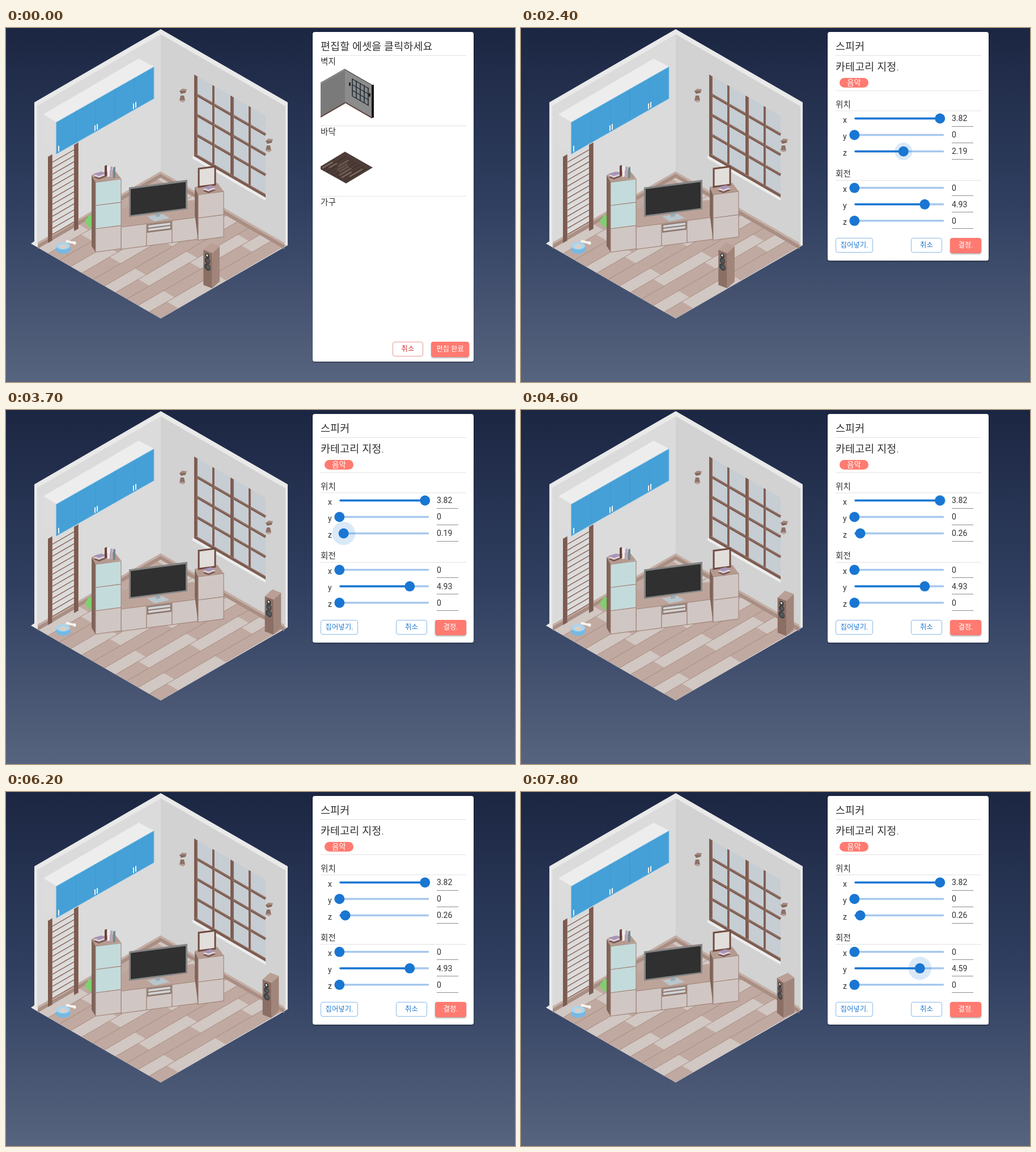
An HTML page for the animation above (8 s loop, 898 px wide and 624 px high).

```html
<!DOCTYPE html>
<html lang="ko">
<head>
<meta charset="utf-8">
<style>
  html, body { margin: 0; width: 100%; height: 100%; overflow: hidden; background: #1b2642; }
  svg { display: block; width: 898px; height: 624px; }
  text { font-family: Roboto, "Noto Sans CJK KR", "Noto Sans CJK", sans-serif; fill: #303030; font-size: 14px; }
  .title { font-size: 18.4px; font-weight: 300; letter-spacing: .2px; }
  .head { font-size: 14.6px; font-weight: 300; }
  .mid { text-anchor: middle; font-size: 12.4px; }
  .rule { stroke: #e2e2e2; }
</style>
</head>
<body>
<svg id="stage" viewBox="0 0 898 624"></svg>
<script>
const LOOP = 8000, STEP = 100;
const BLUE = '#1976d2', CORAL = '#ff7a70', WOOD = '#7d5b50', EDGE = '#a3877c', PALE = '#d0c7c4', TOP = '#b59a8f', SIDE = '#80645a';
const ISO = .577, FRONT = -.13;

const poly = (pts, fill, more = '') => `<polygon points="${pts}" fill="${fill}" ${more}/>`;
const rect = (x, y, w, h, fill, more = '') => `<rect x="${x}" y="${y}" width="${w}" height="${h}" fill="${fill}" ${more}/>`;
const line = (x1, y1, x2, y2, stroke, w = 1) => `<path d="M${x1} ${y1}L${x2} ${y2}" stroke="${stroke}" stroke-width="${w}"/>`;
const disc = (x, y, rx, ry, fill) => `<ellipse cx="${x}" cy="${y}" rx="${rx}" ry="${ry}" fill="${fill}"/>`;
const text = (x, y, s, cls = '', more = '') => `<text x="${x}" y="${y}" class="${cls}" ${more}>${s}</text>`;
const rule = y => `<path class="rule" d="M555 ${y}H812"/>`;
const range = (n, fn) => Array.from({ length: n }, (_, i) => fn(i)).join('');
const shift = (x, y, body) => `<g transform="translate(${x} ${y})">${body}</g>`;

// Upright parallelogram: vertical sides, sloping top and bottom.
const slab = (x, y, w, h, slope, fill, more) =>
  poly([[x, y], [x + w, y + w * slope], [x + w, y + w * slope + h], [x, y + h]].join(' '), fill, more);
const slope = (x, y, w, k, stroke, width) => line(x, y, x + w, y + w * k, stroke, width);

function seeded(seed) {
  return () => (seed = seed * 16807 % 2147483647) / 2147483647;
}

function shell() {
  return poly('273,2 497,131 497,383 273,512 44,380 50,376 50,131', '#e9e9e9') +
    slab(55, 137, 218, 243, -ISO, '#dbdbdb') + slab(273, 11, 220, 243, ISO, '#d2d2d2');
}

// Planks run from the lower left edge up to the right, each with one light board.
function floor() {
  const at = (u, v) => `${(55 + 19.8 * u + 222 * v).toFixed(1)},${(386 + 11.45 * u - 129 * v).toFixed(1)}`;
  const board = (u, a, b) => poly([at(u, a), at(u + 1, a), at(u + 1, b), at(u, b)].join(' '), '#d1c7c3');
  const light = u => {
    const a = (.94 + .32 * u) % 1, b = a + .38;
    return board(u, a, Math.min(b, 1)) + (b > 1 ? board(u, 0, b - 1) : '');
  };
  const skirt = (x, y, w, k) => slab(x, y, w, 11, k, '#a98e83') + slab(x, y, w, 4, k, '#c4aea5');
  return poly([at(0, 0), at(11, 0), at(11, 1), at(0, 1)].join(' '), '#c0a9a0') + range(11, light) +
    range(10, i => `<path d="M${at(i + 1, 0)}L${at(i + 1, 1)}" stroke="${EDGE}" stroke-width=".9"/>`) +
    skirt(56, 378, 217, -ISO) + skirt(273, 253, 218, ISO);
}

function wallCabinet() {
  const x = 89, y = 166, w = 172, h = 56, k = -.567;
  const door = i => line(x + i * w / 5, y + i * w / 5 * k, x + i * w / 5, y + h + i * w / 5 * k, '#3f97cd', .8);
  const handle = d => line(x + d, y + h - 12 + d * k, x + d, y + h - 2 + d * k, '#f2f2f2', 2);
  return slab(66, 152, 23, h - 1, ISO, '#dcdcdc') + poly('66,152 234,54 261,68 89,166', '#ededed') +
    slab(x, y, w, h, k, '#45a0d7', 'stroke="#83c3e8" stroke-width=".8"') +
    range(5, door) + [4, 68, 72, 136, 140].map(handle).join('');
}

function wallBars() {
  const post = (x, y) => slab(x, y, 8, 152, -ISO, WOOD) + line(x + 7.5, y - 4, x + 7.5, y + 147, '#9a7b70');
  return range(13, i => slope(81, 236 + i * 10.6, 40, -ISO, '#eceae8', 2.4) + slope(81, 237 + i * 10.6, 40, -ISO, '#94766b', 1.8)) +
    post(74, 227) + post(120, 206);
}

function windowPane() {
  const x = 332, y = 82, w = 126, h = 143;
  const post = i => {
    const wide = i % 2 ? 4 : 6, px = x + i * 32, py = y + i * 32 * ISO;
    return slab(px, py, wide, h, ISO, WOOD) + line(px + wide - .7, py + 3, px + wide - .7, py + h, '#96776c', 1.2);
  };
  const rail = i => slope(x + 3, y + 35 + i * 35.5, w - 3, ISO, WOOD, 4.6) + slope(x + 3, y + 34 + i * 35.5, w - 3, ISO, '#96776c', 1.4);
  return slab(x - 3, y + h, w + 3, 5, ISO, '#ededed') + slab(x, y, w, h, ISO, '#c6cdd3') +
    range(3, rail) + range(4, post) + slab(x, y + h - 5, w, 6, ISO, WOOD) + slope(x + 2, y + h - 3, w - 2, ISO, '#a08277');
}

const lamp = (x, y) => shift(x, y, poly('0,4 5,0 13,1 11,7 3,9', '#a58a80') + poly('0,4 3,9 11,7 11,4', '#876a5f') +
  poly('2,12 8,12 10,21 6,24 0,21', '#8d7167') + poly('0,20 10,20 6,24', '#b7a198'));

function petThings() {
  return range(3, i => disc(149 - 4 * (i % 2), 335 + i * 5.5, 5.5, 5.5, '#7fd06c')) +
    disc(101, 390, 13, 8, '#77b9e2') + disc(101, 384, 12, 6.5, '#a5d6f2') + disc(101, 385, 7, 4, '#d8cfca') +
    line(108, 376, 121, 379, '#f6f4f1', 4) + disc(108, 376, 2.5, 2.5, '#f6f4f1') + disc(121, 379, 2.5, 3, '#f6f4f1');
}

function furniture() {
  const trim = `stroke="${EDGE}" stroke-width="1.2"`;
  const front = (x, y, h, fill = PALE) => slab(x, y, 45, h, FRONT, fill, trim);
  const book = (y, fill) => poly('0,4 14,0 23,3 10,8', fill, `transform="translate(0 ${y})"`);
  const pile = (x, y) => shift(x, y, book(5, '#79574f') + book(2, '#ddd3df') + book(-1, '#a894b5'));
  const upright = ['#6d4238', '#eee9ee', '#b5a7bf', '#718a8b'].map((c, i) => slab(174 + i * 5, 243 + i, 4, 19, -.4, c)).join('');
  const low = poly('203,318 332,303 340,334 203,351', '#bda49a') + range(3, i => front(203 + i * 45, 351 - i * 5.85, 39)) +
    slab(249, 346, 43, 15, FRONT, '#8f776d') + range(2, i => slab(251, 348 + i * 6, 39, 4, FRONT, '#d0d3d6'));
  const tall = slab(151, 259, 7, 125, 1.6, SIDE) + poly('151,259 191,250 203,265 158,272', TOP) +
    range(3, i => front(158, 272 + i * 41, 41, i < 2 ? '#c4dbdb' : PALE));
  const right = poly('333,280 339,294 339,375 333,328', SIDE) + poly('333,280 373,273 384,288 339,294', TOP) +
    front(339, 294, 41) + front(339, 335, 39) +
    slab(340, 248, 29, 32, FRONT, '#e2dedb', 'stroke="#714b40" stroke-width="3"') + pile(347, 278);
  const tv = poly('249,332 276,328 289,335 262,341', '#b9c6cd') + slab(264, 324, 8, 9, FRONT, '#9caab2') +
    slab(217, 281, 103, 52, FRONT, '#858585') + slab(220, 284, 97, 46, FRONT, '#303030');
  return low + tall + pile(154, 254) + upright + right + tv;
}

function button(x, y, w, label, color, solid) {
  const box = solid ? rect(x, y, w, 27, CORAL, 'rx="4" filter="url(#lift)"')
    : rect(x + .5, y + .5, w - 1, 25, '#fff', `rx="3.5" stroke="${color}" stroke-opacity=".5"`);
  return box + text(x + w / 2, y + 16.5, label, 'mid', `style="fill:${color}"`);
}

const card = h => rect(541, 7, 284, h, '#fff', 'rx="4" filter="url(#lift)"');

function wallThumb() {
  const ink = '#202428';
  return slab(555, 98, 43, 59, -ISO, '#7a7a7a') + slab(598, 73, 49, 58, ISO, '#8c8c8c') +
    slab(610, 88, 30, 32, ISO, '#83898e') +
    range(5, i => line(611 + i * 7, 89 + i * 4, 611 + i * 7, 120 + i * 4, ink, 1.5)) +
    range(4, i => slope(611, 90 + i * 10, 29, ISO, ink, 1.3)) + rect(645, 100, 4, 58, '#151515') +
    slope(555, 97, 43, -ISO, ink) + slope(598, 73, 50, ISO, ink) +
    slope(555, 157, 43, -ISO, '#5b4038', 2) + slope(598, 131, 48, ISO, '#5b4038', 2) +
    rect(605, 96, 3, 6, ink) + rect(640, 115, 3, 6, ink);
}

function floorThumb() {
  const rnd = seeded(11);
  const slat = i => {
    const v = rnd() * 20;
    return slope(558 + i * 5.2 + v, 247 + i * 3.1 - v * ISO, 14 + rnd() * 10, -ISO, '#75625b', 3);
  };
  return poly('555,244 598,218 647,246 600,274 555,249', '#4d3c37') + range(8, slat) +
    range(7, i => slope(560 + i * 6, 250 + i * 3.5, 40, -ISO, '#30231f', .8));
}

function listPanel() {
  return `<g id="list">${card(581)}` + text(555, 39, '편집할 에셋을 클릭하세요', 'title') + rule(48.5) +
    text(555, 63.5, '벽지', 'head') + wallThumb() + rule(172.5) + text(555, 187.5, '바닥', 'head') + floorThumb() + rule(296.5) +
    text(555, 312, '가구', 'head') + button(682, 553, 54, '취소', '#d32f2f') + button(750, 553, 67, '편집 완료', '#fff', true) + '</g>';
}

const rows = ['x', 'y', 'z', 'rx', 'ry', 'rz'].map((key, i) => ({
  key, axis: key.slice(-1), y: (i < 3 ? 159.5 : 281.8) + i % 3 * 29, max: i < 3 ? 4 : 2 * Math.PI
}));
const RAIL = { x: 588.3, w: 158 };

const slider = ({ key, axis, y }) => text(568, y + 7.5, axis) +
  rect(RAIL.x, y - 1.8, RAIL.w, 3.6, '#a7c8ee', 'rx="1.8"') + rect(RAIL.x, y - 1.8, 0, 3.6, BLUE, `rx="1.8" id="fill-${key}"`) +
  `<circle id="halo-${key}" cy="${y}" fill="${BLUE}" fill-opacity=".16"/>` +
  `<circle id="thumb-${key}" cy="${y}" r="9" fill="${BLUE}"/>` +
  text(760, y + 4.8, '', '', `id="value-${key}"`) + rect(760, Math.round(y + 13.5), 38, 1, '#8c8c8c');

function editPanel() {
  return `<g id="edit">${card(403)}` + text(555, 39, '스피커', 'title') + rule(48.5) +
    text(555, 74.5, '카테고리 지정.', 'title') + rect(562, 88, 51, 17, CORAL, 'rx="8.5"') +
    text(587.5, 101, '음악', 'mid', 'style="fill:#fff;font-size:13.2px"') + rule(110.5) +
    text(555, 139.5, '위치', 'head') + rule(146) + text(555, 262, '회전', 'head') + rule(268.5) +
    rows.map(slider).join('') + button(555, 370, 66, '집어넣기.', BLUE) + button(688, 370, 55, '취소', BLUE) +
    button(757, 370, 55, '결정.', '#fff', true) + '</g>';
}

document.getElementById('stage').innerHTML = `<defs>
  <linearGradient id="sky" x2="0" y2="1"><stop stop-color="#1b2642"/><stop offset=".5" stop-color="#303f60"/><stop offset="1" stop-color="#57647f"/></linearGradient>
  <filter id="lift" x="-10%" y="-10%" width="120%" height="130%"><feDropShadow dx="0" dy="1.5" stdDeviation="1.3" flood-opacity=".35"/></filter>
</defs>` + rect(0, 0, 898, 624, 'url(#sky)') + shell() + floor() + windowPane() + lamp(306, 107) + lamp(458, 195) +
  wallCabinet() + wallBars() + petThings() + furniture() + '<g id="speaker"></g>' + listPanel() + editPanel();

const el = id => document.getElementById(id);
const start = { x: 3.82, y: 0, z: 2.19, rx: 0, ry: 4.93, rz: 0 };

// Isometric box: world x runs down right, z runs down left.
function drawSpeaker({ x, z, ry }) {
  const project = (a, b) => [54.1 * (a - b), 31.3 * (a + b)];
  const turn = ry - 1.5 * Math.PI, c = Math.cos(turn), s = Math.sin(turn), tall = 62;
  const [wx, wy] = project(.24 * c, -.24 * s), [dx, dy] = project(.32 * s, .32 * c);
  const [ox, oy] = project(x - start.x, z - start.z);
  const corner = (i, j) => [362.6 + ox + (i * wx + j * dx) / 2, 387.8 + oy + (i * wy + j * dy) / 2];
  const L = corner(-1, 1), F = corner(1, 1), R = corner(1, -1), B = corner(-1, -1);
  const cone = (y, r) => disc(.46, y, r, r * .28, '#3d4144') + disc(.5, y, r * .6, r * .17, '#55595c');
  el('speaker').innerHTML = slab(...L, wx, tall, wy / wx, '#8b6e64') + slab(...F, -dx, tall, dy / dx, '#a1857a') +
    poly([L, B, R, F].join(' '), '#b99f95') +
    `<g transform="matrix(${wx} ${wy} 0 ${tall} ${L})">` + disc(.45, .13, .24, .065, '#34383b') + disc(.43, .12, .11, .03, '#e4e4e4') +
    cone(.27, .3) + cone(.45, .35) + '</g>';
}

const OPEN = 1100;
const drags = [
  { key: 'z', to: 1.34, from: 2600, till: 2900 }, { key: 'z', to: .15, from: 3200, till: 3400 }, { key: 'z', to: .26, from: 3600, till: 3900 },
  { key: 'x', to: 3.71, from: 4800, till: 5500 }, { key: 'x', to: 3.82, from: 5700, till: 6000 },
  { key: 'ry', to: 5, from: 6900, till: 7000 }, { key: 'ry', to: 4.87, from: 7000, till: 7300 }, { key: 'ry', to: 4.59, from: 7400, till: 7800 }
];
const visits = [
  { key: 'ry', enter: 1400, leave: 2100 },
  { key: 'z', enter: 2200, grab: 2500, leave: 4100 },
  { key: 'x', enter: 4500, grab: 4800, leave: 6100 },
  { key: 'ry', enter: 6500, grab: 6900, leave: LOOP }
];

const ramp = (t, from, till) => Math.min(1, Math.max(0, (t - from) / (till - from)));
const fade = (t, from = Infinity) => t > from ? ramp(t, from, from + 150) : 0;

function valuesAt(t) {
  const now = { ...start };
  for (const { key, to, from, till } of drags) now[key] += (to - now[key]) * ramp(t, from, till);
  return now;
}

function haloAt(t, key) {
  const sizes = visits.filter(v => v.key === key)
    .map(v => (15.5 * fade(t, v.enter) + 5 * fade(t, v.grab)) * (1 - fade(t, v.leave)));
  return Math.max(0, ...sizes);
}

function draw(t) {
  const now = valuesAt(t), open = t >= OPEN;
  el('list').style.display = open ? 'none' : '';
  el('edit').style.display = open ? '' : 'none';
  for (const { key, max } of rows) {
    const run = now[key] / max * RAIL.w;
    el('fill-' + key).setAttribute('width', run);
    el('thumb-' + key).setAttribute('cx', RAIL.x + run);
    el('halo-' + key).setAttribute('cx', RAIL.x + run);
    el('halo-' + key).setAttribute('r', haloAt(t, key));
    el('value-' + key).textContent = +now[key].toFixed(2);
  }
  drawSpeaker(now);
}

const began = performance.now();
function tick() {
  const t = (performance.now() - began) % LOOP;
  draw(Math.floor(t / STEP) * STEP);
  requestAnimationFrame(tick);
}
tick();
</script>
</body>
</html>
```
